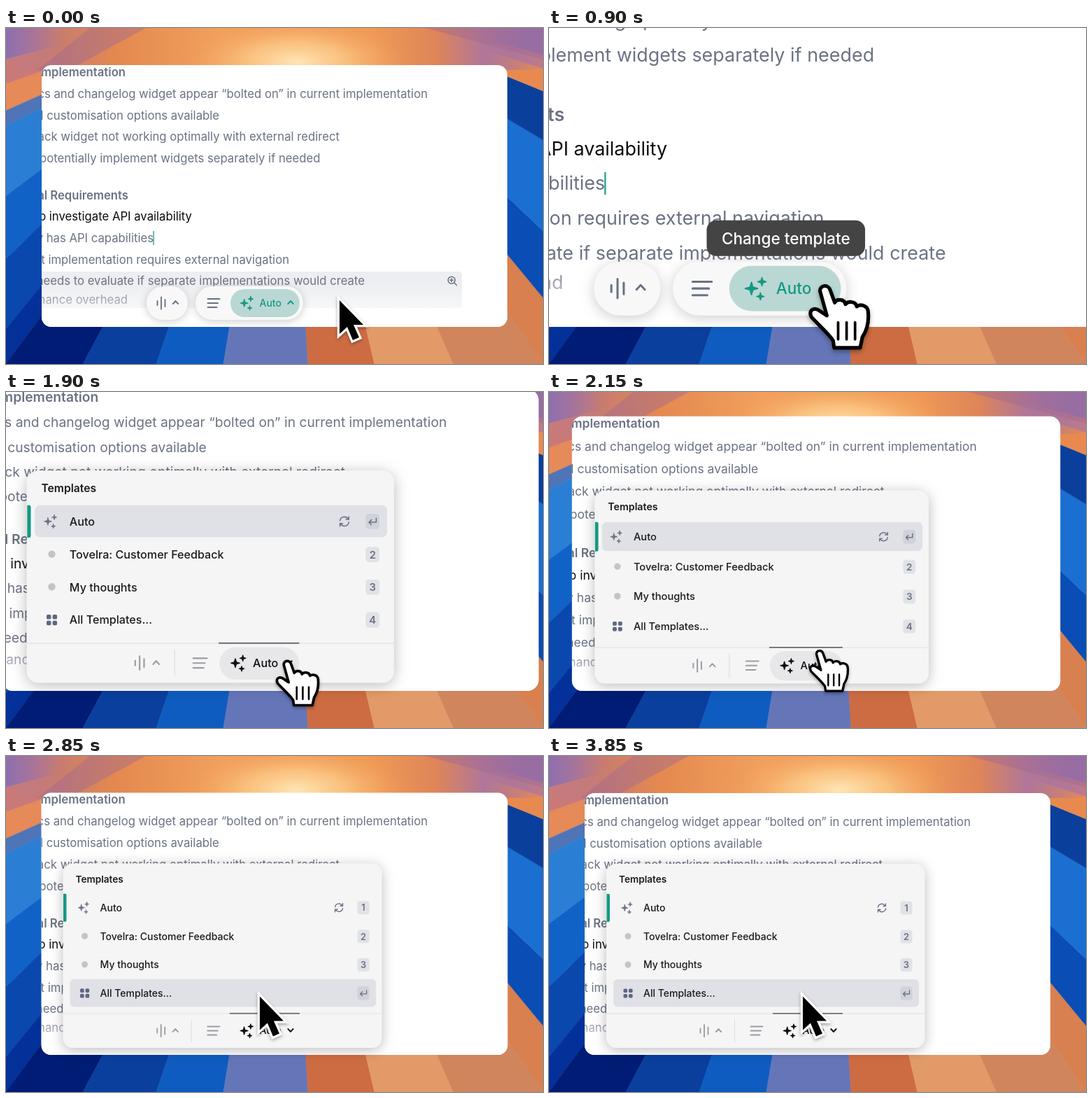
Recreate the animation shown at these times as an HTML page. Size 768 by 480 pixels, loop 3.9 s.

```html
<!DOCTYPE html>
<html lang="en">
<head>
<meta charset="utf-8">
<title>Template menu</title>
<style>
html, body { margin: 0; width: 100%; height: 100%; overflow: hidden; }
svg { display: block; width: 768px; height: 480px; font: 16.7px Inter, "Liberation Sans", sans-serif; }
.ui { font-size: 14px; font-weight: 500; }
.line { fill: none; stroke-width: 1.9; stroke-linecap: round; stroke-linejoin: round; }
.soft { filter: drop-shadow(0 2px 6px #0003); }
</style>
</head>
<body>
<svg id="stage" viewBox="0 0 768 480"></svg>
<script>
const LOOP = 3900, OPEN = 1350, PIVOT = '424 427';
const SLATE = '#6b7284', GREEN = '#149983';

// Wallpaper: rays fanning out from a point above the stage
const rays = [
  [0, 45, '#8f6fae'], [0, 80, '#c97a78'], [0, 118, '#e58a58'], [0, 140, '#4f74b8'],
  [0, 240, '#2a7fd4'], [0, 330, '#1162c6'], [0, 430, '#0a48ae'], [0, 480, '#04309a'],
  [110, 480, '#001c74'], [215, 480, '#0a3f9e'], [311, 480, '#0f5cc0'], [432, 480, '#6576b8'],
  [527, 480, '#cd6c42'], [640, 480, '#e29a68'], [768, 480, '#d0855c'], [768, 385, '#d8804f'],
  [768, 290, '#0a4db4'], [768, 160, '#1a6fd0'], [768, 90, '#0b3f9c'],
  [768, 58, '#e88a50'], [768, 38, '#c07a88'], [768, -60, '#9070b4']
];
let from = [0, -60];
const wallpaper = rays.map(([x, y, color]) => {
  const wedge = `<path d="M400-60L${from}L${x} ${y}Z" fill="${color}" stroke="${color}" stroke-width=".6"/>`;
  from = [x, y];
  return wedge;
}).join('');

const stops = list => list.map(([at, color, alpha = 1]) =>
  `<stop offset="${at}" stop-color="${color}" stop-opacity="${alpha}"/>`).join('');
const sky = stops([[0, '#b87890', 0], [.1, '#c87c70'], [.2, '#e38850'], [.4, '#f2a05c'],
  [.68, '#f09a56'], [.8, '#df8558'], [.89, '#b0769a'], [1, '#9070b4', 0]]);
const glow = stops([[0, '#ffe6b4'], [.45, '#fcc886', .8], [1, '#f2a05c', 0]]);

// Helpers
const box = (x, y, w, h, r, fill, more = '') =>
  `<rect x="${x}" y="${y}" width="${w}" height="${h}" rx="${r}" fill="${fill}" ${more}/>`;
const label = (x, y, text, fill, more = '') => `<text x="${x}" y="${y}" fill="${fill}" ${more}>${text}</text>`;
const icon = (x, y, d, color, more = '') =>
  `<path class="line" transform="translate(${x} ${y})" d="${d}" stroke="${color}" ${more}/>`;
const star = (x, y, r) => {
  const c = r * .24;
  return `M${x} ${y - r}L${x + c} ${y - c} ${x + r} ${y} ${x + c} ${y + c} ${x} ${y + r} ${x - c} ${y + c} ${x - r} ${y} ${x - c} ${y - c}Z`;
};
const sparkles = star(-3.3, 0, 5.6) + star(6, -6, 3.7) + star(4.6, 7, 3.2);
const WAVE = 'M-5.5-3v6M0-8.5v17M5.5-5v10', LINES = 'M-8.5-6H8.5M-8.5 0H6M-8.5 6H4.5';
const UP = 'M-3.7 2L0-2 3.7 2', DOWN = 'M-3.7-2L0 2 3.7-2', ENTER = 'M4.5-4V1H-4.5M-1.5-2L-4.5 1-1.5 4';
const REFRESH = 'M-5.5-1A5.5 5.5 0 0 1 4.5-3.2M5.5-6V-2.5H2M5.5 1A5.5 5.5 0 0 1-4.5 3.2M-5.5 6V2.5H-2';

// Document
const notes = [
  [171, 63, 'Widget implementation', 600],
  [603, 94, 'Docs and changelog widget appear “bolted on” in current implementation'],
  [305, 125, 'Minimal customisation options available'],
  [477, 155.5, 'Feedback widget not working optimally with external redirect'],
  [449.5, 186.5, 'Could potentially implement widgets separately if needed'],
  [175, 239, 'Technical Requirements', 600],
  [266, 269.5, 'Need to investigate API availability', 400, '#0c0c0e'],
  [211, 300, 'Company has API capabilities'],
  [405, 331, 'Current implementation requires external navigation'],
  [513, 361.5, 'Team needs to evaluate if separate implementations would create'],
  [174, 388, 'maintenance overhead']
].map(([x, y, text, weight = 400, color = SLATE]) =>
  label(x, y + 5.8, text, color, `text-anchor="end" font-weight="${weight}"`)).join('');

const page = `
  ${box(51, 53, 666, 374, 14, '#fff')}
  <g clip-path="url(#page)">
    <g id="hover">${box(30, 348, 622, 52, 5, '#edeef1')}
      ${icon(638, 361, 'M4.2-.8A5 5 0 1 1-5.8-.8A5 5 0 1 1 4.2-.8M3 3L6.5 6.5M-.8-3v4.4M-3-.8h4.4', SLATE, 'style="stroke-width:1.6"')}</g>
    ${notes}
    ${box(210.3, 290, 1.5, 20, 0, '#2aa79a')}
    ${box(51, 364, 666, 63, 0, 'url(#fade)')}
  </g>`;

const pills = `<g id="pills" class="ui">
  <g class="soft">${box(201, 369, 59, 48, 24, '#f8f8f9')}${box(271, 369, 154, 48, 24, '#f8f8f9')}</g>
  ${box(321, 373, 99, 40, 20, '#bad8d3')}
  ${icon(222, 393, WAVE, SLATE)}${icon(242.5, 392, UP, SLATE)}${icon(297, 393, LINES, SLATE)}
  ${icon(344, 393, sparkles, GREEN, `style="fill:${GREEN};stroke-width:1"`)}
  ${label(362.5, 398, 'Auto', GREEN)}${icon(407, 392, UP, GREEN)}
</g>`;

const tooltip = `<g id="tooltip" class="ui">${box(301, 332.7, 140.4, 31.6, 8.5, '#444445')}
  ${label(371.2, 353.8, 'Change template', '#fff', 'text-anchor="middle"')}</g>`;

// Menu
const rowY = [217, 258, 298.5, 339];
const tiles = [-6.5, 1].map(x => [-6.5, 1].map(y => box(113 + x, 339 + y, 5.6, 5.6, 1.6, '#5d6780')).join('')).join('');
const rows = ['Auto', 'Tovelra: Customer Feedback', 'My thoughts', 'All Templates...'].map((name, i) => {
  const y = rowY[i];
  return label(135, y + 5, name, '#1b1b1e') + box(502.5, y - 9.5, 17, 19, 4, '#8088a0', 'opacity=".17"') +
    `<g id="digit${i}">${label(511, y + 4.8, i + 1, SLATE, 'text-anchor="middle" font-size="13" font-weight="600"')}</g>` +
    `<g id="enter${i}">${icon(511, y, ENTER, SLATE, 'style="stroke-width:1.4"')}</g>`;
}).join('');

const menu = `<g id="menu" class="ui">
  ${box(82, 154, 455.5, 263, 14, '#f5f5f6', 'style="filter:drop-shadow(0 3px 9px #0004)"')}
  <path d="M82.5 197h2.5q2 0 2 2v36q0 2-2 2h-2.5z" fill="${GREEN}"/>
  ${label(100, 181, 'Templates', '#1b1b1e', 'font-size="13.6" font-weight="600"')}
  <g id="selection">${box(92, -20, 437, 39.5, 6, '#e0e1e6')}</g>
  ${rows}
  ${icon(111, 217, sparkles, SLATE, `style="fill:${SLATE};stroke-width:.8"`).replace('217)', '217) scale(.85)')}
  <g fill="#c3c4c6"><circle cx="113" cy="257.5" r="4.5"/><circle cx="113" cy="298" r="4.5"/></g>
  ${tiles}${icon(476, 217, REFRESH, SLATE, 'style="stroke-width:1.4"')}
  ${box(82, 367.5, 455.5, 1, 0, '#e1e1e4')}${box(265, 376, 1, 33, 0, '#dedee1')}
  <g id="tabPill">${box(321, 373, 99, 40, 20, '#e7e7e9')}</g>
  <rect id="tabLine" x="320" y="367" width="100" height="1.6"/>
  ${icon(222, 392.5, WAVE, '#9c9da3')}${icon(242.5, 392, UP, '#9c9da3')}${icon(297, 392.5, LINES, '#9c9da3')}
  <g id="tab">${icon(344, 392.5, sparkles, 'currentColor', 'style="fill:currentColor;stroke-width:1"')}
    ${label(362.5, 397.5, 'Auto', 'currentColor')}${icon(407, 392, DOWN, 'currentColor')}</g>
</g>`;

const pointer = `<g id="cursor" style="filter:drop-shadow(0 2px 2px #0005)">
  <path id="arrow" d="M0 0V48L11 38 19 57 28 53 20 35H34Z" stroke="#fff" stroke-width="6.5" paint-order="stroke"/>
  <g id="hand" stroke="#000" stroke-width="3.2" stroke-linecap="round" stroke-linejoin="round">
    <path fill="#fff" d="M-4.5 5.5C-5-.5 3-.8 4.5 4.5L8.5 15.5C10 12 17 12 18 17 20 14 27 14 28 19 31 16.5 37.5 18 38 23 39 32 37 40 33 46L31 55.5H8L7 49C3 43-5 36-12 28.5-15 23-11 19.5-6 22L1.5 27Z"/>
    <path d="M11.5 33V48M19 33V48M26.5 33V48" stroke-width="2.3"/>
  </g>
</g>`;

document.getElementById('stage').innerHTML = `
  <defs>
    <linearGradient id="sky">${sky}</linearGradient>
    <radialGradient id="glow">${glow}</radialGradient>
    <linearGradient id="fade" x2="0" y2="1"><stop stop-color="#fff" stop-opacity="0"/><stop offset="1" stop-color="#fff"/></linearGradient>
    <clipPath id="page">${box(51, 53, 666, 374, 14, '#fff')}</clipPath>
  </defs>
  ${wallpaper}${box(0, 0, 768, 60, 0, 'url(#sky)')}
  <g fill="#a0688f" opacity=".45"><path d="M120 0H200L90 60H45Z"/><path d="M600 0H768V45Z"/></g>
  <ellipse cx="415" cy="48" rx="160" ry="62" fill="url(#glow)"/>
  <g id="camera">${page}${pills}${tooltip}${menu}${pointer}</g>`;

const $ = id => document.getElementById(id);
const show = (id, on) => $(id).setAttribute('visibility', on ? 'inherit' : 'hidden');
const clamp = (t, a, b) => Math.min(1, Math.max(0, (t - a) / (b - a)));
const ease = (t, a, b) => { const p = clamp(t, a, b); return p * p * (3 - 2 * p); };
const spring = ms => { const x = Math.max(0, ms) * .0058; return 1 - (1 + x) * Math.exp(-x); };

function draw(t) {
  const zoom = t < 1380 ? 1 + .8 * spring(t - 420) : 1 + .78 * (1 - spring(t - 1380));
  $('camera').setAttribute('transform', `translate(${PIVOT}) scale(${zoom}) translate(-424 -427)`);

  const go = ease(t, 150, 800), leave = ease(t, 1850, 2550);
  const x = 477 - 71 * go - 43 * leave, y = 389 + go - 46.5 * leave;
  const press = 1 - .06 * (ease(t, 1230, 1320) - ease(t, 1470, 1600));
  $('cursor').setAttribute('transform', `translate(${x} ${y}) scale(${press})`);

  const open = t >= OPEN, overTab = x < 420 && y > 368, chosen = y < 359 ? 3 : 0;
  show('hand', overTab);
  show('arrow', !overTab);
  show('hover', x > 425);
  show('pills', !open);
  show('menu', open);
  $('tooltip').setAttribute('opacity', open ? 0 : clamp(t, 660, 780));

  show('tabPill', open && overTab);
  $('selection').setAttribute('transform', `translate(0 ${rowY[chosen]})`);
  rowY.forEach((_, i) => {
    show('digit' + i, open && i !== chosen);
    show('enter' + i, open && i === chosen);
  });
  const settle = clamp(t, 1500, 1650), mix = (a, b) => a + (b - a) * settle;
  $('tab').style.color = `rgb(${mix(20, 15)},${mix(153, 15)},${mix(131, 17)})`;
  $('tabLine').setAttribute('fill', `rgb(${mix(15, 100)},${mix(15, 100)},${mix(17, 102)})`);
}

const start = performance.now();
function tick() {
  draw((performance.now() - start) % LOOP);
  requestAnimationFrame(tick);
}
tick();
</script>
</body>
</html>
```
